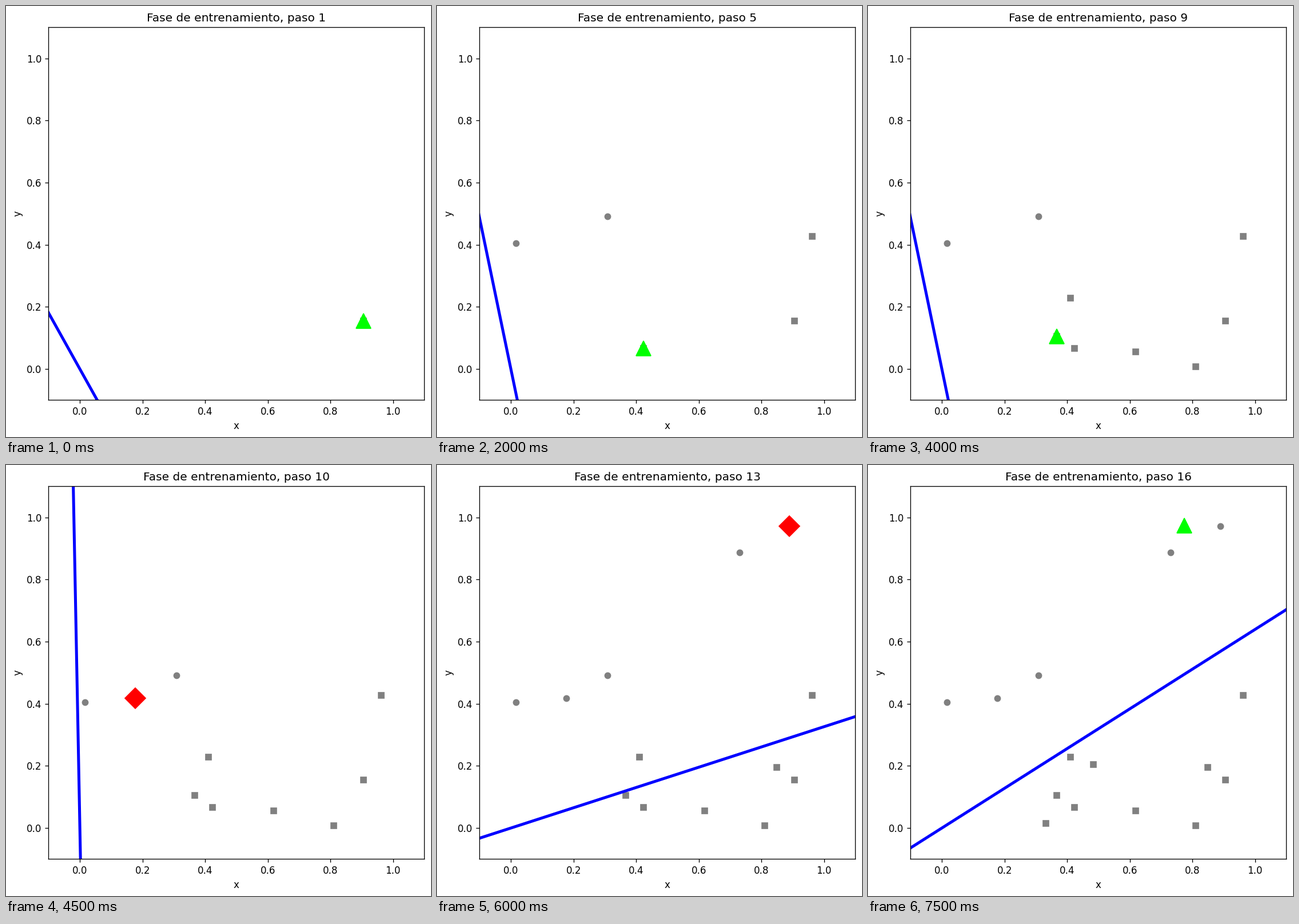
Animation, 743 px wide and 754 px high, one loop 8 s. Source, as a matplotlib script:

```python
import numpy as np
import matplotlib.pyplot as plt
from matplotlib.animation import FuncAnimation

W, H, DPI = 743, 754, 121
STEP_MS = 500
DECAY = 0.95                  # learning rate factor after each mistake
START = (2.3286, 1.2883)      # initial weights

SAMPLES = np.array([
    (0.905, 0.155), (0.309, 0.491), (0.962, 0.427), (0.016, 0.405),
    (0.424, 0.066), (0.619, 0.0545), (0.4105, 0.229), (0.8105, 0.007),
    (0.367, 0.105), (0.176, 0.418), (0.730, 0.887), (0.849, 0.196),
    (0.890, 0.972), (0.483, 0.2045), (0.332, 0.0145), (0.7735, 0.973),
])
BELOW = SAMPLES[:, 1] < SAMPLES[:, 0]


def train(steps):
    """Perceptron weights after some samples, and whether the last was missed."""
    w, rate, wrong = np.array(START), 1.0, False
    for point, below in zip(SAMPLES[:steps], BELOW):
        wrong = (w @ point > 0) != below
        if wrong:
            w = w + (rate if below else -rate) * point
            rate *= DECAY
    return w, wrong


fig = plt.figure(figsize=(W / DPI, H / DPI), dpi=DPI, facecolor="white")
ax = fig.add_axes([74.4 / W, (H - 689.45) / H, 657 / W, 652.25 / H])
ax.set(xlim=(-0.1, 1.1), ylim=(-0.1, 1.1), xlabel="x", ylabel="y")
title = ax.set_title("")


def markers(shape, color, size, z):
    return ax.plot([], [], shape, color=color, markersize=size, zorder=z)[0]


circles = markers("o", "gray", 6, 2.0)
squares = markers("s", "gray", 6, 2.0)
boundary, = ax.plot([], [], color="blue", linewidth=3, zorder=2.1)
hit = markers("^", "lime", 15, 2.2)
miss = markers("D", "red", 15, 2.2)


def update(i):
    seen, below = SAMPLES[:i + 1], BELOW[:i + 1]
    squares.set_data(*seen[below].T)
    circles.set_data(*seen[~below].T)

    w, wrong = train(i + 1)
    reach = np.array([-3, 3]) / np.hypot(*w)
    boundary.set_data(w[1] * reach, -w[0] * reach)

    for art, shown in ((hit, not wrong), (miss, wrong)):
        art.set_data(*SAMPLES[i:i + 1].T)
        art.set_visible(shown)

    title.set_text(f"Fase de entrenamiento, paso {i + 1}")
    return circles, squares, boundary, hit, miss, title


anim = FuncAnimation(fig, update, frames=len(SAMPLES), interval=STEP_MS,
                     repeat=True, repeat_delay=0, blit=False)
plt.show()
```
